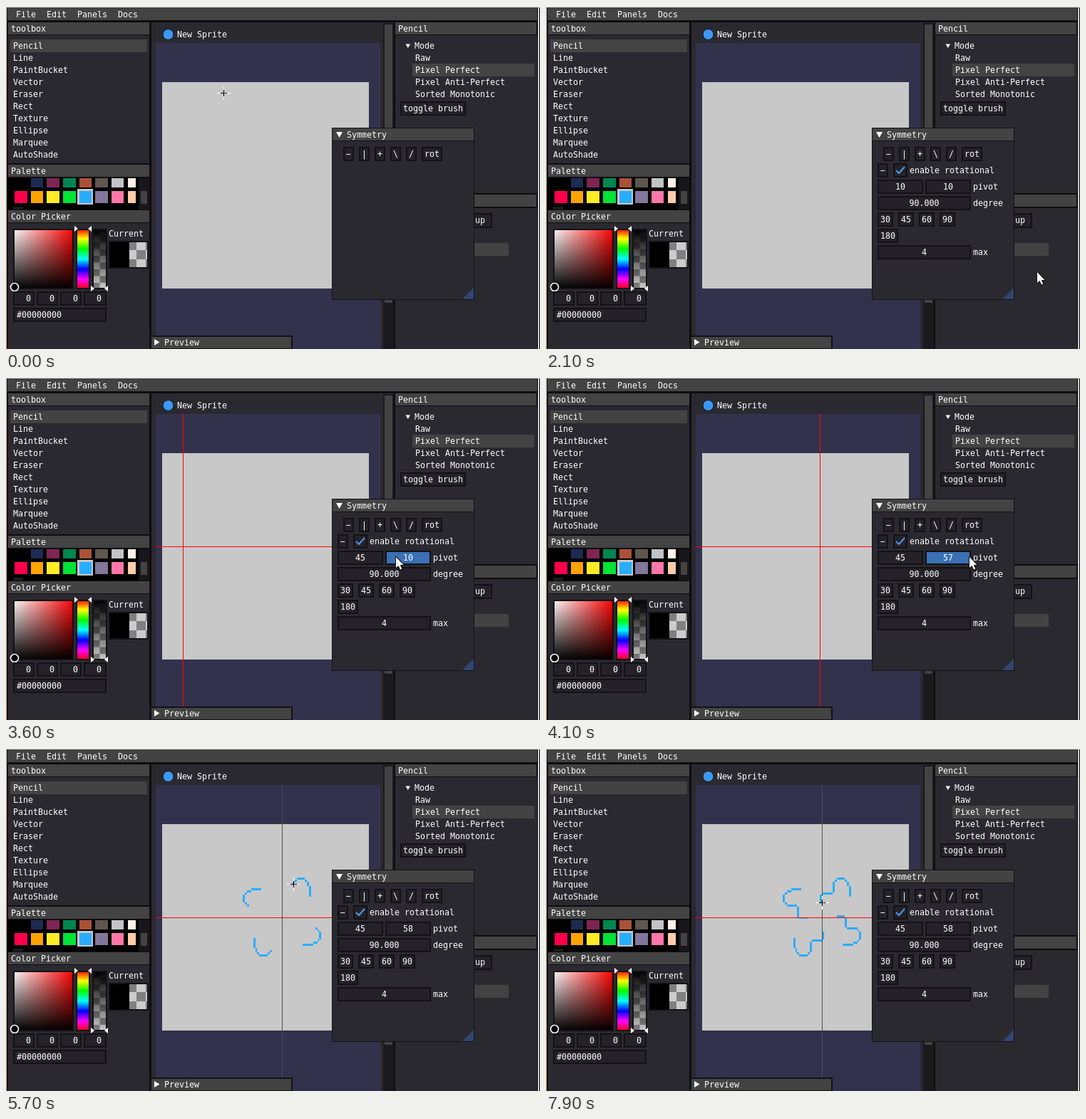
Write an HTML page with a canvas that moves like this. It is 749 px wide and 482 px high and loops after 8 s.

```html
<!DOCTYPE html>
<html lang="en">
<head>
<meta charset="utf-8">
<title>Sprite editor</title>
<style>
html, body { margin: 0; width: 100%; height: 100%; overflow: hidden; background: #000; }
canvas { display: block; }
</style>
</head>
<body>
<canvas id="stage" width="749" height="482"></canvas>
<script>
const ctx = document.getElementById('stage').getContext('2d');
const LOOP = 8000, STEP = 100;
const BODY = '#2b2930', BAR = '#434343', EDGE = '#121115', FIELD = '#242228', ACTIVE = '#3a70b4';
const SPRITE = { x: 219, y: 107, cell: 2.9, pivotX: 58, pivotY: 45 };

const clamp = (v, lo, hi) => Math.min(hi, Math.max(lo, v));

// Linear interpolation over rows of [time, value, value...]
function track(rows, t) {
  if (t <= rows[0][0]) return rows[0].slice(1);
  for (let i = 1; i < rows.length; i++) {
    const a = rows[i - 1], b = rows[i];
    if (t <= b[0]) {
      const k = (t - a[0]) / (b[0] - a[0]);
      return a.slice(1).map((v, j) => v + (b[j + 1] - v) * k);
    }
  }
  return rows[rows.length - 1].slice(1);
}

const cursorTrack = [
  [0, 305, 122], [100, 305, 123], [200, 305, 123], [500, 400, 152], [900, 599, 211], [1000, 588, 211],
  [1300, 588, 211], [1400, 588, 210], [1600, 588, 211], [1800, 640, 280], [2000, 736, 406],
  [2200, 640, 340], [2400, 505, 255], [2700, 505, 255], [2800, 505, 254], [3000, 521, 251],
  [3300, 540, 252], [3600, 546, 252], [3700, 551, 252], [4100, 593, 252], [4300, 594, 252],
  [4600, 445, 215], [4700, 430, 211], [4800, 427, 208], [5000, 426, 199]
];
const firstTrack = [[2800, 10], [2900, 17], [3000, 26], [3300, 45]];
const secondTrack = [[3600, 10], [3700, 15], [4100, 57], [4200, 58]];
const strokeTrack = [
  [4800, 0], [5000, 3], [5500, 12], [6400, 20], [6500, 21],
  [6800, 22], [7000, 22], [7100, 23], [7500, 23], [7900, 26]
];

// The pencil path as sprite cells, one step per cell between knots
const knots = [
  [71, 34], [71, 30], [70, 29], [70, 28], [68, 26], [65, 26],
  [63, 28], [63, 32], [62, 33], [58, 33], [57, 34], [57, 37]
];
const path = [knots[0]];
knots.slice(1).forEach(([x, y], i) => {
  const [px, py] = knots[i];
  const n = Math.max(Math.abs(x - px), Math.abs(y - py));
  for (let s = 1; s <= n; s++) path.push([px + (x - px) * s / n, py + (y - py) * s / n]);
});

function rect(x0, y0, x1, y1, color) {
  ctx.fillStyle = color;
  ctx.fillRect(x0, y0, x1 - x0, y1 - y0);
}

function frame(x0, y0, x1, y1) {
  ctx.strokeStyle = EDGE;
  ctx.lineWidth = 2;
  ctx.strokeRect(x0 + 1, y0 + 1, x1 - x0 - 2, y1 - y0 - 2);
}

function poly(color, ...pts) {
  ctx.fillStyle = color;
  ctx.beginPath();
  pts.forEach(p => ctx.lineTo(...p));
  ctx.closePath();
  ctx.fill();
}

function text(str, x, baseline, align = 'left') {
  ctx.fillStyle = '#fff';
  ctx.textAlign = align;
  ctx.fillText(str, x, baseline);
}

function box(x0, y0, x1, y1, fill = FIELD) {
  rect(x0, y0, x1, y1, EDGE);
  rect(x0 + 2, y0 + 2, x1 - 2, y1 - 2, fill);
}

function button(label, x, y, fill) {
  box(x, y, x + label.length * 7 + 8, y + 20, fill);
  text(label, x + 4, y + 14);
}

function field(label, x0, y, x1, fill) {
  box(x0, y, x1, y + 20, fill);
  text(label, (x0 + x1) / 2, y + 14, 'center');
}

function titleBar(label, x, y) {
  rect(x, y, x + 198, y + 17, BAR);
  text(label, x + 4, y + 13);
}

function gradient(x0, y0, x1, y1, horizontal, colors) {
  const g = horizontal ? ctx.createLinearGradient(x0, 0, x1, 0) : ctx.createLinearGradient(0, y0, 0, y1);
  colors.forEach((c, i) => g.addColorStop(i / (colors.length - 1), c));
  rect(x0, y0, x1, y1, g);
}

function checker(x0, y0, x1, y1, size, origin) {
  rect(x0, y0, x1, y1, '#ccc');
  for (let y = y0, row = 0; y < y1; y += size, row++)
    for (let x = origin + (row % 2) * size; x < x1; x += size * 2)
      if (x + size > x0) rect(Math.max(x, x0), y, Math.min(x + size, x1), Math.min(y + size, y1), '#808080');
}

function drawPalette() {
  rect(3, 242, 201, 286, '#000');
  rect(186, 242, 201, 286, '#17161a');
  rect(189, 260, 198, 278, BAR);
  rect(10, 282, 24, 286, '#1c1b20');
  const rows = [
    ['#000', '#1d2b53', '#7e2553', '#008751', '#ab5236', '#5f574f', '#c2c3c7', '#fff1e8'],
    ['#ff004d', '#ffa300', '#ffec27', '#00e436', '#29adff', '#83769c', '#ff77a8', '#ffccaa']
  ];
  rect(100, 257, 122, 279, '#c8c8c8');
  rows.forEach((colors, r) => colors.forEach((c, i) => {
    const x = 12 + i * 22.65;
    rect(Math.round(x), r ? 260 : 242, Math.min(Math.round(x + 17.57), 182), r ? 277 : 255, c);
  }));
}

function drawPicker() {
  gradient(10, 313, 95, 398, true, ['#fff', '#f00']);
  gradient(10, 313, 95, 398, false, ['rgba(0,0,0,0)', '#000']);
  frame(10, 313, 95, 398);
  gradient(98, 313, 118, 398, false, ['#f00', '#ff0', '#0f0', '#0ff', '#00f', '#f0f', '#f00']);
  frame(98, 313, 118, 398);
  checker(122, 313, 141, 398, 9.5, 122);
  gradient(122, 313, 141, 398, false, ['#000', 'rgba(0,0,0,0)']);
  frame(121, 313, 142, 398);
  for (const [left, right, y] of [[96, 120, 313], [119, 143, 397]]) {
    poly('#fff', [left, y - 4], [left + 5, y], [left, y + 4]);
    poly('#fff', [right, y - 4], [right - 5, y], [right, y + 4]);
  }
  ctx.beginPath();
  ctx.arc(12, 395, 5.5, 0, Math.PI * 2);
  ctx.fillStyle = '#000';
  ctx.fill();
  ctx.strokeStyle = '#fff';
  ctx.lineWidth = 1.6;
  ctx.stroke();
  text('Current', 144, 324);
  rect(144, 330, 173, 369, '#000');
  checker(173, 330, 200, 369, 13, 144);
  frame(144, 330, 200, 369);
  for (let i = 0; i < 4; i++) {
    const x = 10 + i * 33;
    box(x, 401, i < 3 ? x + 30 : 141, 421);
    text('0', x + 18, 415);
  }
  box(10, 424, 141, 444);
  text('#00000000', 15, 438);
}

function drawLeft() {
  rect(3, 41, 201, 221, BODY);
  titleBar('toolbox', 3, 23);
  rect(6, 47, 198, 65, BAR);
  ['Pencil', 'Line', 'PaintBucket', 'Vector', 'Eraser', 'Rect', 'Texture', 'Ellipse', 'Marquee', 'AutoShade']
    .forEach((name, i) => text(name, 10, 60 + i * 17));
  drawPalette();
  titleBar('Palette', 3, 223);
  rect(3, 305, 201, 482, BODY);
  titleBar('Color Picker', 3, 287);
  drawPicker();
}

function drawCenter() {
  rect(204, 23, 544, 482, BODY);
  ctx.beginPath();
  ctx.arc(227.5, 40, 7.5, 0, Math.PI * 2);
  ctx.fillStyle = '#3c98f4';
  ctx.fill();
  ctx.strokeStyle = EDGE;
  ctx.lineWidth = 1;
  ctx.stroke();
  text('New Sprite', 240, 44);
  rect(210, 52, 525, 482, '#33324d');
  rect(219, 107, 509, 397, '#c8c8c8');
  rect(529, 24, 544, 482, '#1a191d');
  rect(531, 26, 542, 417, BAR);
}

function drawRight() {
  rect(546, 41, 745, 263, BODY);
  titleBar('Pencil', 546, 23);
  poly('#fff', [560.5, 53.5], [567, 53.5], [563.8, 59]);
  text('Mode', 573, 60);
  rect(570, 81, 741, 99, BAR);
  ['Raw', 'Pixel Perfect', 'Pixel Anti-Perfect', 'Sorted Monotonic']
    .forEach((name, i) => text(name, 574, 77 + i * 17));
  button('toggle brush', 553, 134);
  rect(546, 265, 744, 282, BAR);
  rect(546, 284, 745, 482, BODY);
  box(640, 291, 682, 312);
  text('up', 658, 305);
  rect(560, 333, 705, 351, BAR);
}

function drawFrame() {
  rect(0, 0, 749, 482, '#0d0c0f');
  gradient(0, 0, 1, 482, false, ['#d8d0cc', '#c8a890', '#d8a468']);
  rect(746, 0, 748, 482, '#d0cccc');
  rect(0, 0, 749, 2, '#e4e2e2');
  rect(2, 2, 745, 20, BAR);
  [['File', 14], ['Edit', 57], ['Panels', 100], ['Docs', 157]].forEach(([name, x]) => text(name, x, 16));
}

function drawPreview() {
  rect(202, 463, 402, 482, EDGE);
  rect(204, 465, 400, 481, BAR);
  poly('#fff', [208, 468], [215.5, 472.5], [208, 477]);
  text('Preview', 222, 477);
}

function drawGuides(t) {
  if (t < 2900) return;
  const y = Math.round(SPRITE.y + track(firstTrack, t - 22)[0] * SPRITE.cell);
  const x = Math.round(SPRITE.x + track(secondTrack, t)[0] * SPRITE.cell);
  const idle = '#4c4c54';
  rect(x, 52, x + 1, 463, t < 4300 ? '#f00' : idle);
  rect(210, y, 525, y + 1, t < 3500 ? idle : '#f00');
}

function drawCell(cx, cy) {
  const edge = (origin, n) => Math.round(origin + n * SPRITE.cell);
  rect(edge(SPRITE.x, cx), edge(SPRITE.y, cy), edge(SPRITE.x, cx + 1), edge(SPRITE.y, cy + 1), '#29adff');
}

function drawStroke(t) {
  if (t < 4800) return;
  const last = Math.floor(track(strokeTrack, t)[0] + 0.01);
  for (const [x, y] of path.slice(0, last + 1)) {
    let dx = x + 0.5 - SPRITE.pivotX, dy = y + 0.5 - SPRITE.pivotY;
    for (let turn = 0; turn < 4; turn++) {
      drawCell(SPRITE.pivotX + dx - 0.5, SPRITE.pivotY + dy - 0.5);
      [dx, dy] = [-dy, dx];
    }
  }
}

function drawSymmetry(t) {
  rect(457, 171, 657, 413, EDGE);
  rect(458, 172, 656, 189, BAR);
  rect(458, 190, 656, 412, BODY);
  poly('#fff', [463, 177], [472, 177], [467.5, 185]);
  text('Symmetry', 478, 185);
  poly('#30466f', [656, 396], [656, 412], [640, 412]);
  const hover = t >= 900 && t < 1700;
  ['−', '|', '+', '\\', '/', 'rot'].forEach((label, i) =>
    button(label, 473 + i * 22, 198, label === 'rot' && hover ? BAR : FIELD));
  if (t < 1700) return;

  button('−', 465, 221);
  box(487, 221, 507, 241);
  ctx.strokeStyle = '#4a9bea';
  ctx.lineWidth = 2;
  ctx.beginPath();
  ctx.moveTo(491, 231);
  ctx.lineTo(495, 235);
  ctx.lineTo(503, 226);
  ctx.stroke();
  text('enable rotational', 510, 235);
  const value = rows => String(Math.round(track(rows, t)[0]));
  field(value(firstTrack), 465, 244, 529, t >= 2700 && t < 3400 ? ACTIVE : FIELD);
  field(value(secondTrack), 532, 244, 596, t >= 3600 && t < 4300 ? ACTIVE : FIELD);
  text('pivot', 599, 258);
  field('90.000', 465, 267, 596);
  text('degree', 599, 281);
  ['30', '45', '60', '90'].forEach((label, i) => button(label, 465 + i * 29, 290));
  button('180', 465, 313);
  field('4', 465, 336, 596);
  text('max', 599, 350);
}

function cursorAt(t) {
  if (t <= 5000) return track(cursorTrack, t);
  const s = clamp(track(strokeTrack, t)[0], 0, path.length - 1);
  const a = path[Math.floor(s)], b = path[Math.ceil(s)], k = s % 1;
  const drift = track([[7100, 0], [7500, 0], [7900, 1]], t)[0];
  return [
    SPRITE.x + (a[0] + (b[0] - a[0]) * k + 0.5) * SPRITE.cell + drift * 2,
    SPRITE.y + (a[1] + (b[1] - a[1]) * k + 0.5) * SPRITE.cell + drift * 2
  ];
}

function drawCross(x, y) {
  for (const [r, color] of [[9, '#fff'], [4, '#000']]) {
    rect(x - r, y, x + r + 1, y + 1, color);
    rect(x, y - r, x + 1, y + r + 1, color);
  }
  rect(x + 1, y, x + 3, y + 1, '#e0203c');
}

function drawArrow(x, y) {
  ctx.strokeStyle = '#111';
  ctx.lineWidth = 2;
  ctx.lineJoin = 'round';
  const shape = [[0, 0], [0, 15], [3.4, 12], [6, 17.6], [8.2, 16.6], [5.8, 11], [10.4, 11]];
  ctx.beginPath();
  shape.forEach(([dx, dy]) => ctx.lineTo(x + 1 + dx, y + 1 + dy));
  ctx.closePath();
  ctx.stroke();
  ctx.fillStyle = '#fff';
  ctx.fill();
}

function drawCursor(t) {
  const [x, y] = cursorAt(t).map(Math.floor);
  if (t >= 900 && t < 1700) {
    const tipX = t < 1000 ? x + 25 : 613;
    rect(tipX, 212, tipX + 85, 240, '#141317');
    text('Rotational', tipX + 8, 231);
  }
  if (x < 457) drawCross(x, y);
  else drawArrow(x, y);
}

function render(t) {
  ctx.font = "11.63px 'DejaVu Sans Mono', monospace";
  drawFrame();
  drawLeft();
  drawCenter();
  drawRight();
  drawStroke(t);
  drawGuides(t);
  drawPreview();
  drawSymmetry(t);
  drawCursor(t);
}

const start = performance.now();
function tick() {
  const t = (performance.now() - start) % LOOP;
  render(Math.floor(t / STEP) * STEP);
  requestAnimationFrame(tick);
}
tick();
</script>
</body>
</html>
```
